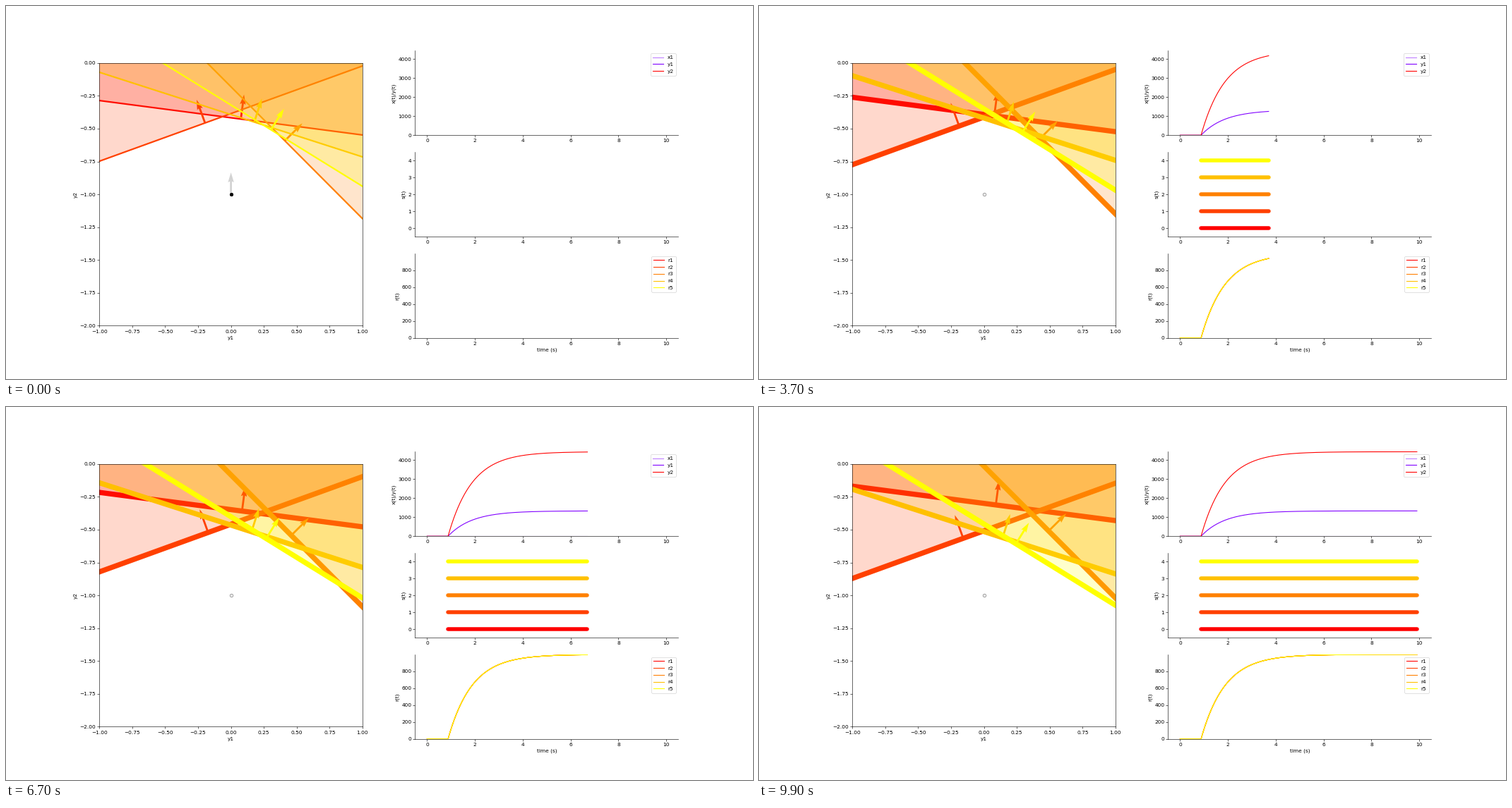
A matplotlib script for the animation above (10 s loop, 1058 by 529 pixels).

```python
import numpy as np
import matplotlib.pyplot as plt
from matplotlib.animation import FuncAnimation
from matplotlib.patches import Polygon

FRAMES, STEP = 100, 0.1
START = np.array([0.0, -1.0])
REACH = 0.578            # distance from the start point to every boundary
DRIFT, DRIFT_AT = 0.0147, 2.0
DRIFT_SIGN = [1, -1, 1, -1, -1]
SLOPES = np.array([-0.131, 0.3625, -1.004, -0.322, -0.6186])
NORMALS = np.column_stack([-SLOPES, np.ones(5)]) / np.hypot(SLOPES, 1)[:, None]
T_SPIKE = -np.log(1 - REACH / NORMALS[0, 1])

HOT = plt.cm.autumn(np.linspace(0, 1, 5))
VIOLET, RED = plt.cm.rainbow([0.0, 1.0])
EDGE_X = np.array([-3.0, 3.0])

times = np.linspace(0, 9.9, 991)
rate = 1000 * (1 - np.exp(-np.clip(times - T_SPIKE, 0, None)))
gain = NORMALS.sum(axis=0)
y1 = gain[0] * rate
y2 = gain[1] * rate - np.exp(-times)

fig = plt.figure(figsize=(20, 10), dpi=52.9)
plane = fig.add_subplot(1, 2, 1)
plane.set(xlim=(-1, 1), ylim=(-2, 0), xlabel="y1", ylabel="y2")
plane.set_aspect("equal")


def time_axes(row, label, low, high):
    ax = fig.add_subplot(3, 2, 2 * row)
    ax.set(xlim=(-0.5, 10.5), ylim=(low, high), ylabel=label)
    ax.spines[["top", "right"]].set_visible(False)
    return ax


signal_ax = time_axes(1, "x(t)/y(t)", -1, y2.max())
spike_ax = time_axes(2, "s(t)", -0.5, 4.5)
rate_ax = time_axes(3, "r(t)", 0, rate.max())
rate_ax.set_xlabel("time (s)")

# Time traces: (line, data)
traces = []


def trace(ax, data, color, label, alpha=1):
    line, = ax.plot([], [], color=color, alpha=alpha, label=label)
    traces.append((line, data))


trace(signal_ax, 0 * times, VIOLET, "x1", 0.5)
trace(signal_ax, y1, VIOLET, "y1")
trace(signal_ax, y2, RED, "y2")
for k in range(5):
    trace(rate_ax, rate, HOT[k], f"r{k + 1}")
signal_ax.legend(loc="upper right")
rate_ax.legend(loc="upper right")

spikes = [spike_ax.plot([], [], color=c, lw=7.5, solid_capstyle="round")[0]
          for c in HOT]


def arrow(pos, vec, color, scale, zorder):
    return plane.quiver(*pos, *vec, color=color, scale=scale,
                        scale_units="width", width=0.0075, zorder=zorder)


# Later fills tint earlier lines, so everything shares one zorder
edges, fills, arrows = [], [], []
for normal, color in zip(NORMALS, HOT):
    edges += plane.plot([], [], color=color, zorder=1)
    fill = Polygon(np.zeros((4, 2)), fc=color, alpha=0.2, lw=0, zorder=1)
    fills.append(plane.add_patch(fill))
    arrows.append(arrow(START, normal, color, 10.65, 1))

plane.plot(*START, "o", mfc="white", mec="gray", zorder=3)
leak = arrow(START, -START, "lightgray", 12, 3)
dot, = plane.plot([], [], "o", color="black", zorder=4)


def draw(i):
    t = i * STEP
    spiking = t > T_SPIKE
    shift = DRIFT * max(0, t - DRIFT_AT)

    for k in range(5):
        foot = START + (REACH + DRIFT_SIGN[k] * shift) * NORMALS[k]
        edge_y = foot[1] + SLOPES[k] * (EDGE_X - foot[0])
        edges[k].set_data(EDGE_X, edge_y)
        edges[k].set_linewidth(10 if spiking else 3)
        fills[k].set_xy([(-3, edge_y[0]), (3, edge_y[1]), (3, 5), (-3, 5)])
        arrows[k].set_offsets([foot])
        spikes[k].set_data([T_SPIKE, t] if spiking else [],
                           [k, k] if spiking else [])

    state = START * np.exp(-t)
    dot.set_data([state[0]], [state[1]])
    leak.set_offsets([state])
    leak.set_UVC([-state[0]], [-state[1]])
    for artist in (dot, leak):
        artist.set_visible(not spiking)

    n = 10 * i + 1
    for line, data in traces:
        line.set_data(times[:n], data[:n])
    return []


anim = FuncAnimation(fig, draw, frames=FRAMES, interval=100,
                     init_func=lambda: draw(0), repeat=True, repeat_delay=0)
plt.show()
```
